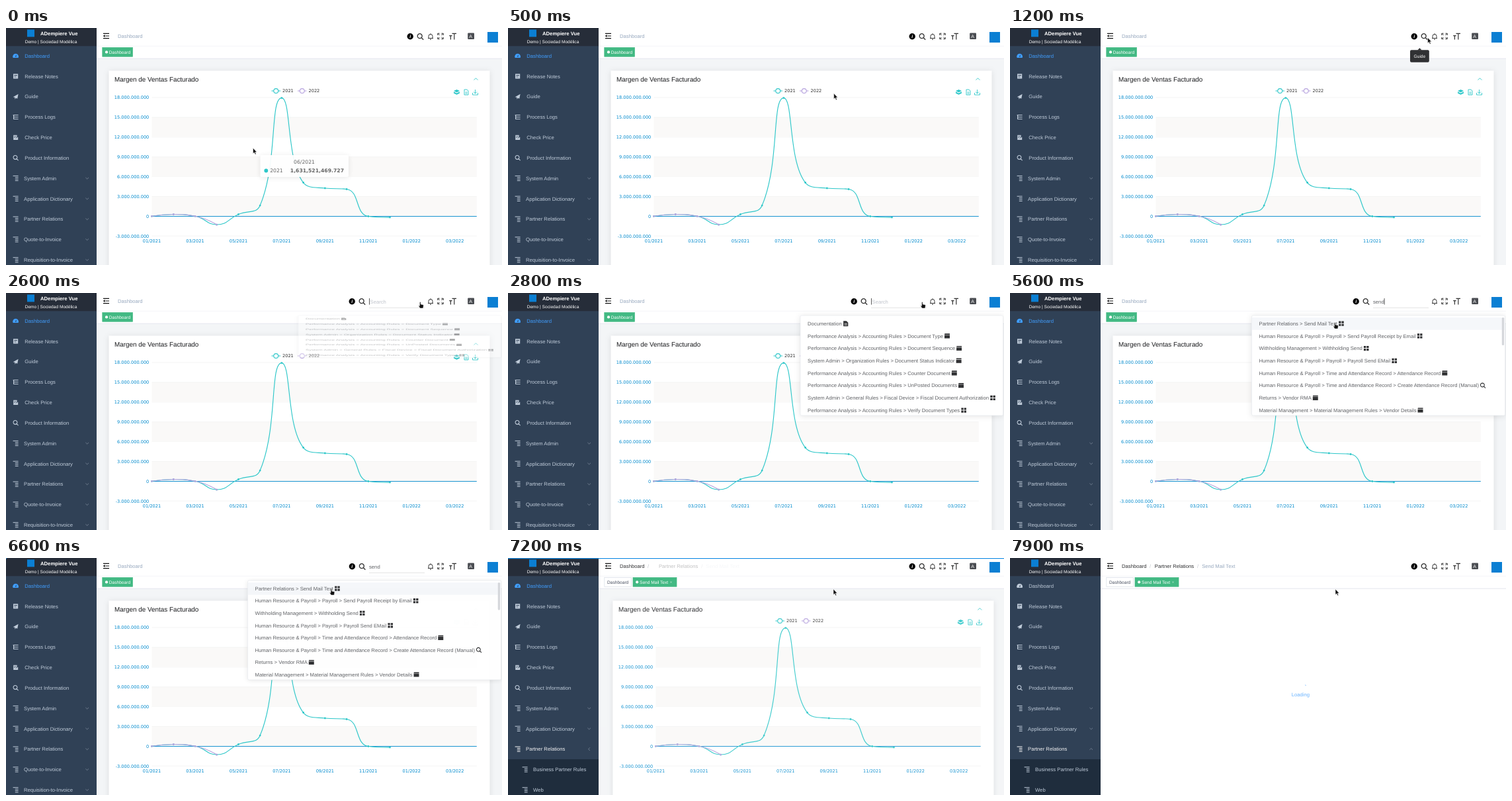
Recreate the animation shown at these times as an HTML page. Size 750x358 px, loop 8 s.

```html
<!DOCTYPE html>
<html lang="es">
<head>
<meta charset="utf-8">
<title>Dashboard search</title>
<style>
html, body { margin: 0; width: 100%; height: 100%; overflow: hidden; background: #fff; }
svg { display: block; width: 100vw; height: 100vh; }
text { font-family: "Liberation Sans", Arial, sans-serif; text-rendering: geometricPrecision; white-space: pre; }
.chart text { font-family: "DejaVu Sans", sans-serif; }
.card { filter: drop-shadow(0 1px 4px rgba(0,0,0,.1)); }
</style>
</head>
<body>
<svg id="stage" viewBox="0 0 750 358">
  <defs>
    <clipPath id="page"><rect x="137" y="46.5" width="613" height="312"/></clipPath>
    <clipPath id="list"><rect x="137" y="36" width="613" height="148.6"/></clipPath>
  </defs>
</svg>
<script>
const stage = document.getElementById('stage');
const LOOP = 8000, TEAL = '#2ec7c9', LILAC = '#b6a2de', AXIS = '#008acd', BLUE = '#409eff', MENU = '#bfcbd9';

function el(parent, tag, attrs = {}, text) {
  const node = document.createElementNS('http://www.w3.org/2000/svg', tag);
  for (const k in attrs) node.setAttribute(k, attrs[k]);
  if (text != null) node.textContent = text;
  return parent.appendChild(node);
}
const group = (parent, attrs) => el(parent, 'g', attrs);
const rect = (parent, x, y, width, height, fill, more) => el(parent, 'rect', { x, y, width, height, fill, ...more });
const path = (parent, d, stroke, width = 1, more) =>
  el(parent, 'path', { d, fill: 'none', stroke, 'stroke-width': width, ...more });
const dot = (parent, cx, cy, r, fill, more) => el(parent, 'circle', { cx, cy, r, fill, ...more });
// y is the middle of the line
const label = (parent, x, y, str, size, fill, more) =>
  el(parent, 'text', { x, y: y + size * .355, 'font-size': size, fill, ...more }, str);

// [path, stroke width]; without a width the shape is filled
const ICONS = {
  gauge: ['M-4 3A4.4 4.4 0 1 1 4 3ZM-.8 1.6L1-2 .9 1.8Z'],
  note: ['M-3.6-3.6H3.6V3.6H-3.6ZM-2.3-1.8V-.9H2.3V-1.8ZM-2.3.6V1.5H1V.6Z'],
  plane: ['M-4 .6L4-4 2.6 3.2 .2 2-1 4-1.4 1.2Z'],
  tree: ['M-4-3H4M-1 0H4M-1 3H4M-3-3V3H-1M-3 0H-1', 1.2],
  list: ['M-4-3.6H4M-.8-1.2H4M-.8 1.2H4M-.8 3.6H4', 1],
  check: ['M-3.4-3.6H2V-1L-.5 2 3.6-.8V3.6H-3.4ZM-2.2-1.8V-1H.8V-1.8ZM-2.2 0V.8H-.8V0Z'],
  find: ['M1.6 1.5L4 3.9M2.3-.7A2.9 2.9 0 1 1-3.5-.7 2.9 2.9 0 1 1 2.3-.7Z', 1.1],
  window: ['M-4-1.4H4V3.5H-4ZM-4-2L-3.6-3.7H4V-2Z'],
  grid: ['M-3.8-3.6H-.5V-.5H-3.8ZM.5-3.6H3.8V-.5H.5ZM-3.8 .5H-.5V3.6H-3.8ZM.5 .5H3.8V3.6H.5Z'],
  file: ['M-3.6-4H1L3.6-1.4V4H-3.6ZM-2.2-.4V.4H2.2V-.4ZM-2.2 1.6V2.4H2.2V1.6Z'],
  bell: ['M-4 2.6H4M-3 2.6V-.6A3 3 0 0 1 3-.6V2.6M0-3.6V-4.6M-1 4.2H1', 1],
  full: ['M-4.2-1.4V-4.2H-1.4M1.4-4.2H4.2V-1.4M4.2 1.4V4.2H1.4M-1.4 4.2H-4.2V1.4M-4-4L-1.4-1.4M4-4L1.4-1.4M4 4L1.4 1.4M-4 4L-1.4 1.4', 1],
  layers: ['M0-4L4.5-2 0 .3-4.5-2ZM-4.5-.8L0 1.5 4.5-.8V1.4L0 3.8-4.5 1.4Z'],
  sheet: ['M-3-4H1L3-2V4H-3ZM-1.5 0H1.5M-1.5 2H1.5', .9],
  save: ['M0-4V2M-2.5-.5L0 2 2.5-.5M-4 1V4H4V1', .9]
};
function icon(parent, name, x, y, color, size = 1) {
  const [d, width] = ICONS[name], transform = `translate(${x} ${y}) scale(${size})`;
  return width ? path(parent, d, color, width, { transform })
    : el(parent, 'path', { d, fill: color, 'fill-rule': 'evenodd', transform });
}
const show = (node, on) => node.setAttribute('display', on ? 'inline' : 'none');
const fade = (node, v) => node.setAttribute('opacity', v);
const move = (node, x, y = 0) => node.setAttribute('transform', `translate(${x} ${y})`);
const span = (t, a, b) => Math.min(1, Math.max(0, (t - a) / (b - a)));
const smooth = p => p * p * (3 - 2 * p);
// cubic-bezier(.25, .1, .25, 1)
function ease(p) {
  let lo = 0, hi = 1;
  for (let i = 0; i < 20; i++) {
    const u = (lo + hi) / 2, x = .75 * u * (1 - u) + u * u * u;
    if (x < p) lo = u; else hi = u;
  }
  return .3 * lo * (1 - lo) ** 2 + 3 * lo * lo * (1 - lo) + lo ** 3;
}

// ---- dashboard page
const board = group(group(stage, { 'clip-path': 'url(#page)' }));
rect(board, 100, 46, 700, 312, '#f3f5f7');
rect(board, 155.5, 64.5, 576, 320, '#fff', { class: 'card' });
label(board, 164, 77, 'Margen de Ventas Facturado', 9.9, '#1a1b1e');
const chart = group(board, { class: 'chart' });
path(chart, 'M707.6 78.6L710.5 75.7 713.4 78.6', TEAL, .9);
[['layers', 681.5], ['sheet', 696], ['save', 709.5]].forEach(([n, x]) => icon(chart, n, x, 97, TEAL));

const X0 = 220.5, X1 = 711.8, MONTH = 32.73, STEP = 29.87;
const yOf = v => 284.3 - v / 3 * STEP;
for (let v = -3; v <= 18; v += 3) {
  const y = yOf(v);
  if (v > 0 && v % 6 === 3) rect(chart, X0, y, X1 - X0, STEP, '#faf9f8');
  path(chart, `M${X0} ${y}H${X1}`, '#eee', .6);
  label(chart, 216.3, y, v ? v + '.000.000.000' : '0', 6.6, AXIS, { 'text-anchor': 'end' });
}
path(chart, `M${X0} 284.5H${X1}`, AXIS, .9);
for (let i = 0; i < 8; i++) {
  const m = i * 2 % 12 + 1;
  label(chart, X0 + i * 2 * MONTH, 321.7, `${String(m).padStart(2, '0')}/${i < 6 ? 2021 : 2022}`, 6.6, AXIS, { 'text-anchor': 'middle' });
}

// smooth line whose handles stay inside the box of each segment
function curve(values, color) {
  const pts = values.map((v, i) => [X0 + i * MONTH, yOf(v)]);
  const dist = (a, b) => Math.hypot(a[0] - b[0], a[1] - b[1]);
  const within = (q, a, b) => q.map((v, k) => Math.min(Math.max(a[k], b[k]), Math.max(Math.min(a[k], b[k]), v)));
  let d = `M${pts[0]}`, out = pts[0];
  for (let i = 1; i < pts.length; i++) {
    const [a, b, c] = [pts[i - 1], pts[i], pts[i + 1]];
    let before = b, after = b;
    if (c) {
      const ab = dist(a, b), bc = dist(b, c), part = bc / (ab + bc) / 2;
      after = within(b.map((v, k) => v + (c[k] - a[k]) * part), b, c);
      before = within(b.map((v, k) => v - (after[k] - v) * ab / bc), a, b);
      after = b.map((v, k) => v + (v - before[k]) * bc / ab);
    }
    d += `C${out} ${before} ${b}`;
    out = after;
  }
  path(chart, d, color, 1.15);
  pts.forEach(q => dot(chart, q[0], q[1], 1.4, color));
}
curve([0, .28, 0, -1.28, .28, 1.63, 17.95, 5.1, 4.25, 4.1, -.02, -.18], TEAL);
curve([0, .28, 0, -1.28], LILAC);
[[401.5, '2021', TEAL], [441, '2022', LILAC]].forEach(([x, year, color]) => {
  path(chart, `M${x} 95H${x + 13.5}`, color, 1.1);
  dot(chart, x + 6.75, 95, 3.4, '#fff', { stroke: color, 'stroke-width': 1.1 });
  label(chart, x + 16.5, 95, year, 6.6, '#333');
});
const tip = group(chart);
rect(tip, 384.5, 192, 133.5, 33, '#fff', { rx: 2, class: 'card', opacity: .94 });
label(tip, 451, 202.4, '06/2021', 7.7, '#666', { 'text-anchor': 'middle' });
dot(tip, 393.3, 215.5, 2.9, TEAL);
label(tip, 399.2, 215.5, '2021', 7.7, '#666');
label(tip, 511, 215.5, '1,631,521,469.727', 7.7, '#666', { 'text-anchor': 'end', 'font-weight': 700 });

// ---- loading page
const loading = group(group(stage, { 'clip-path': 'url(#page)' }));
label(loading, 443.4, 206.5, 'Loading', 7.7, BLUE, { 'text-anchor': 'middle' });
path(loading, 'M450.2 191.8L451.6 192.6', BLUE, .9);

// ---- top bar
rect(stage, 137, 0, 613, 46.3, '#fff');
path(stage, 'M137 27.3H750', '#eceef1', .6);
path(stage, 'M137 46.2H750', '#d8dce5', .7);
path(stage, 'M147 8.4H156M150.5 12H156M147 15.6H156', '#111', 1.2);
el(stage, 'path', { d: 'M146.8 12L149.6 10V14Z', fill: '#111' });

const crumbHome = label(stage, 169, 12.6, 'Dashboard', 7.7, '#97a8be');
const slash = label(stage, 211, 12.6, '/', 7.7, '#c0c4cc');
const crumb1 = group(stage), crumb2 = group(stage);
label(crumb1, 218.8, 12.6, 'Partner Relations', 7.7, '#303133');
label(crumb1, 283, 12.6, '/', 7.7, '#c0c4cc');
label(crumb2, 290.2, 12.6, 'Send Mail Text', 7.7, '#97a8be');

const tabsA = group(stage), tabsB = group(stage);
function tab(parent, x, w, str, active) {
  rect(parent, x, 29.6, w, 13.6, active ? '#42b983' : '#fff', { stroke: active ? '#42b983' : '#d8dce5', 'stroke-width': .7 });
  if (active) dot(parent, x + 6.2, 36.4, 2.1, '#fff');
  label(parent, x + (active ? 10 : 4.2), 36.4, str, 6.6, active ? '#fff' : '#495060');
}
tab(tabsA, 145.8, 45.6, 'Dashboard', true);
tab(tabsB, 145.8, 40.6, 'Dashboard', false);
tab(tabsB, 189, 66, 'Send Mail Text', true);
path(tabsB, 'M245.4 35.4L247.6 37.6M247.6 35.4L245.4 37.6', '#d8f0e5', .6);

const finder = group(stage);
dot(finder, 611.2, 12.8, 4.7, '#000');
label(finder, 611.2, 12.8, 'i', 7.4, '#fff', { 'text-anchor': 'middle', 'font-family': 'Liberation Serif, serif', 'font-weight': 700, 'font-style': 'italic' });
icon(finder, 'find', 626.4, 13, '#333', 1.2);
const field = group(stage);
path(field, 'M549 22.4H633', '#d9d9d9', .7);
const hint = label(field, 550.5, 12.8, 'Search', 7.7, '#c0c4cc');
const typed = label(field, 549, 12.8, '', 7.7, '#606266');
const caret = rect(field, 549, 8, .8, 9.6, '#333');
icon(stage, 'bell', 642, 13, '#333');
icon(stage, 'full', 657, 12.4, '#333');
path(stage, 'M674.5 8.4H681M677.8 8.4V17.4M670.2 11.6H674.6M672.4 11.6V17.4', '#333', 1.2);
rect(stage, 698.2, 7.6, 9.8, 9.4, '#4a4d52', { rx: 1 });
label(stage, 702.6, 12.4, 'A', 7, '#fff', { 'text-anchor': 'middle' });
rect(stage, 728, 6, 16, 16, '#0b7fd3');

const guide = group(stage);
rect(guide, 605, 33.3, 28.8, 18.4, '#303133', { rx: 2 });
el(guide, 'path', { d: 'M616.2 33.5L619.4 30.3 622.6 33.5Z', fill: '#303133' });
label(guide, 619.4, 42.5, 'Guide', 6.6, '#fff', { 'text-anchor': 'middle' });

// ---- side menu
rect(stage, 0, 0, 137, 358, '#304156');
rect(stage, 0, 0, 137, 27.3, '#262d39');
rect(stage, 32, 2.4, 11, 11, '#0b7fd3');
label(stage, 52, 8.4, 'ADempiere Vue', 7.7, '#fff', { 'font-weight': 700 });
label(stage, 68, 20.8, 'Demo | Sociedad Modélica', 6.6, '#fff', { 'text-anchor': 'middle' });
const rowY = i => 42 + i * 30.83;
function entry(parent, i, str, name, { indent = 0, fill = MENU } = {}) {
  const x = name === 'list' ? 27 : 28.3;
  return [icon(parent, name, 14.6 + indent, rowY(i), fill), label(parent, x + indent, rowY(i), str, 7.7, fill)];
}
const chevron = (parent, y) => path(parent, 'M-2.3 -1.1L0 1.1 2.3 -1.1', '#7d8a9b', .8, { transform: `translate(122.7 ${y})` });
const home = entry(stage, 0, 'Dashboard', 'gauge');
[['Release Notes', 'note'], ['Guide', 'plane'], ['Process Logs', 'tree'], ['Check Price', 'check'], ['Product Information', 'find'],
 ['System Admin', 'list'], ['Application Dictionary', 'list']].forEach(([s, n], i) => {
  entry(stage, i + 1, s, n);
  if (n === 'list') chevron(stage, rowY(i + 1));
});
const partner = entry(stage, 8, 'Partner Relations', 'list');
const partnerArrow = chevron(stage, rowY(8));
const closedMenu = group(stage), openMenu = group(stage);
['Quote-to-Invoice', 'Requisition-to-Invoice'].forEach((s, i) => {
  entry(closedMenu, 9 + i, s, 'list');
  chevron(closedMenu, rowY(9 + i));
});
rect(openMenu, 0, rowY(8.5), 137, 60, '#1f2d3d');
['Business Partner Rules', 'Web'].forEach((s, i) => entry(openMenu, 9 + i, s, 'list', { indent: 11 }));

// ---- suggestion lists
function panel(x, rows) {
  const g = group(stage);
  rect(g, x, 34, 748.6 - x, 151, '#fff', { rx: 2, stroke: '#e4e7ed', 'stroke-width': .6, class: 'card' });
  const inner = group(g, { 'clip-path': 'url(#list)' });
  const hover = rect(inner, x + .4, 37, 747.8 - x, 18.7, '#f5f7fa');
  const bar = rect(inner, 743.8, 37, 3.3, 42, '#d5d7db', { rx: 1.6 });
  rows.forEach((row, i) => {
    const [str, name] = row.split('|'), y = 46.2 + i * 18.7;
    const text = label(inner, x + 11, y, str, 7.7, '#606266');
    icon(inner, name, x + 17 + text.getComputedTextLength(), y, '#303133');
  });
  return { g, hover, bar };
}
const PA = 'Performance Analysis > Accounting Rules > ', SA = 'System Admin > General Rules > ', HR = 'Human Resource & Payroll > ';
const panels = [
  panel(442, ['Documentation|file', PA + 'Document Type|window', PA + 'Document Sequence|window',
    'System Admin > Organization Rules > Document Status Indicator|window', PA + 'Counter Document|window',
    PA + 'UnPosted Documents|window', SA + 'Fiscal Device > Fiscal Document Authorization|grid', PA + 'Verify Document Types|grid']),
  panel(284.8, ['Server > Scheduler|window', 'Security > Session Audit|window', 'Security > User Browser|find',
    'System Rules > System Image|window', 'System Rules > System Configurator|window', 'Security > Reset Password|grid',
    'Security > Access Audit|window', 'Security > Process Audit|window'].map(s => SA + s)),
  panel(365.5, ['Partner Relations > Send Mail Text|grid', HR + 'Payroll > Send Payroll Receipt by Email|grid',
    'Withholding Management > Withholding Send|grid', HR + 'Payroll > Payroll Send EMail|grid',
    HR + 'Time and Attendance Record > Attendance Record|window',
    HR + 'Time and Attendance Record > Create Attendance Record (Manual)|find', 'Returns > Vendor RMA|window',
    'Material Management > Material Management Rules > Vendor Details|window'])
];

const progress = rect(stage, 0, 0, 0, 1.2, '#1e90e6');
const arrow = el(stage, 'path', { d: 'M0 0V8.4L1.9 6.7 3.3 9.8 4.7 9.2 3.3 6.2H5.8Z', fill: '#111', stroke: '#fff', 'stroke-width': .5 });
const hand = el(stage, 'path', { d: 'M-1 0Q0-.8 .6 0V3L4.2 3.8Q5 4.2 4.8 5.4L4.2 9H-.4L-2.6 5.6Q-2.4 4.6-1 5.6Z', fill: '#111', stroke: '#fff', 'stroke-width': .5 });

// [time, x, y] of the pointer tip
const TRACK = [[100, 373.5, 181.3], [900, 611, 17], [1150, 632, 14.5], [1450, 626.5, 14], [4650, 626.5, 14],
  [5250, 483, 50], [5500, 491.5, 45], [5600, 491.5, 45], [6000, 492, 47]];
function pointer(t) {
  let i = 0;
  while (i < TRACK.length - 2 && t > TRACK[i + 1][0]) i++;
  const [a, b] = [TRACK[i], TRACK[i + 1]], p = smooth(span(t, a[0], b[0]));
  return [a[1] + (b[1] - a[1]) * p, a[2] + (b[2] - a[2]) * p];
}

function draw(t) {
  fade(tip, 1 - span(t, 200, 500));
  fade(guide, span(t, 850, 1000) * (1 - span(t, 1300, 1450)));

  const open = ease(span(t, 1450, 1650)) * (1 - ease(span(t, 6600, 6800)));
  move(finder, -88 * open);
  show(field, open > .3);
  fade(field, open);
  const word = t < 3500 ? '' : 'send'.slice(0, t < 3800 ? 1 : 2 + Math.floor((t - 3800) / 100));
  typed.textContent = word;
  show(hint, !word);
  caret.setAttribute('x', word ? 549 + typed.getComputedTextLength() : 549);
  show(caret, t < 6400);

  const current = t < 2600 || t >= 6750 ? -1 : t < 3500 ? 0 : t < 4100 ? 1 : 2;
  const grow = ease(span(t, 2550, 2750)) * (1 - span(t, 6600, 6750));
  const [px, py] = pointer(t);
  panels.forEach(({ g, hover, bar }, i) => {
    show(g, i === current);
    g.setAttribute('transform', `translate(0 ${34 * (1 - grow)}) scale(1 ${grow})`);
    fade(g, grow);
    show(hover, py > 37);
    show(bar, py > 34);
  });

  const overSearch = t >= 1300 && t < 4700, overList = current === 2 && py > 37;
  show(arrow, !overSearch && !overList);
  show(hand, overSearch || overList);
  move(arrow, px, py);
  move(hand, px, py);

  progress.setAttribute('width', 750 * (.3 * span(t, 6600, 6800) + .7 * span(t, 7050, 7200)));
  fade(progress, 1 - span(t, 7250, 7450));

  const routed = t >= 7100;
  show(tabsA, !routed);
  show(tabsB, routed);
  show(closedMenu, !routed);
  show(openMenu, routed);
  const turn = 180 * smooth(span(t, 7100, 7300));
  partnerArrow.setAttribute('transform', `translate(122.7 ${rowY(8)}) rotate(${turn})`);
  const tint = ([ic, tx], color) => {
    ic.setAttribute(ic.hasAttribute('stroke') ? 'stroke' : 'fill', color);
    tx.setAttribute('fill', color);
  };
  tint(home, t < 7350 ? BLUE : MENU);
  tint(partner, routed ? '#f4f4f5' : MENU);

  crumbHome.setAttribute('fill', routed ? '#303133' : '#97a8be');
  show(slash, routed);
  const e = ease(span(t, 7100, 7420));
  [crumb1, crumb2].forEach((c, i) => {
    move(c, 20 * (1 - e));
    fade(c, e ** (2 + 2 * i));
  });

  const leave = ease(span(t, 7150, 7650)), enter = ease(span(t, 7615, 8115));
  move(board, 30 * leave);
  fade(board, 1 - leave);
  move(loading, -30 * (1 - enter));
  fade(loading, enter * .9);
}

const start = performance.now();
(function tick() {
  draw((performance.now() - start) % LOOP);
  requestAnimationFrame(tick);
})();
</script>
</body>
</html>
```
